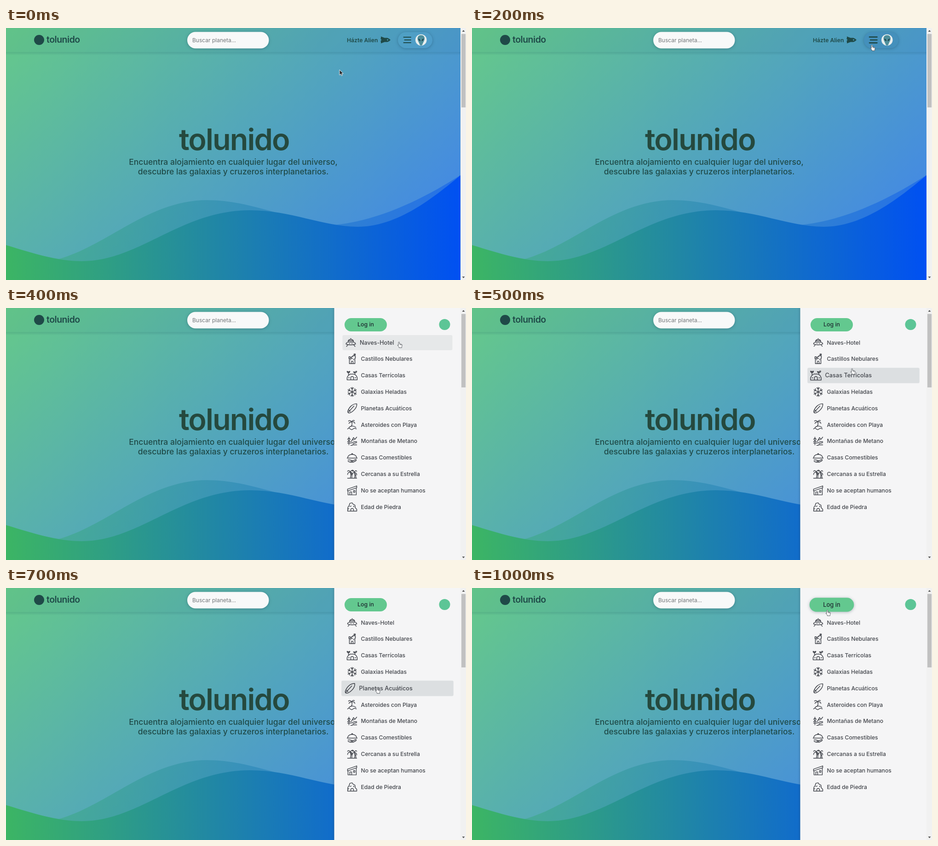
Recreate the animation shown at these times as an HTML page. Size 1000x549 px, loop 1.1 s.

```html
<!DOCTYPE html>
<html lang="es">
<head>
<meta charset="utf-8">
<title>tolunido</title>
<style>
  html, body { margin: 0; width: 100%; height: 100%; overflow: hidden; }
  svg { display: block; width: 1000px; height: 549px; font: 500 12.15px Inter, sans-serif; }
  .ink { fill: #1f4a48; }
  .line { fill: none; stroke: #40434a; stroke-width: 1.45; stroke-linecap: round; stroke-linejoin: round; }
  .soft { filter: drop-shadow(0 1px 3px rgba(10, 40, 60, .3)); }
  .row rect { fill: #dcdfe1; }
  .row text { fill: #42454b; }
</style>
</head>
<body>
<svg viewBox="0 0 1000 549">
  <defs>
    <linearGradient id="sky" gradientUnits="userSpaceOnUse" x1="110" y1="-110" x2="822" y2="602">
      <stop stop-color="#65c98a"/><stop offset="1" stop-color="#4286e8"/>
    </linearGradient>
    <linearGradient id="sea" gradientUnits="userSpaceOnUse" x1="0" y1="0" x2="989" y2="0">
      <stop stop-color="#3cb564"/><stop offset="1" stop-color="#0050f2"/>
    </linearGradient>
    <linearGradient id="shade" x2="0" y2="1">
      <stop stop-color="#0a3c50" stop-opacity=".14"/><stop offset="1" stop-color="#0a3c50" stop-opacity="0"/>
    </linearGradient>
  </defs>

  <rect width="989" height="549" fill="url(#sky)"/>
  <g fill="url(#sea)">
    <path fill-opacity=".45" d="M0 473C40 485 75 497 115 503C220 474 310 375 437 375C535 375 610 419 715 429C808 420 905 374 989 320V549H0Z"/>
    <path d="M0 473C60 491 110 508 165 508C290 508 380 397 530 397C620 397 690 433 765 433C850 433 928 371 989 320V549H0Z"/>
  </g>

  <g class="ink">
    <text x="376" y="266" font-size="65" font-weight="600" letter-spacing="-2" fill="#25493e">tolunido</text>
    <g font-size="17.5" text-anchor="middle">
      <text x="494" y="298">Encuentra alojamiento en cualquier lugar del universo,</text>
      <text x="494" y="318.5">descubre las galaxias y cruzeros interplanetarios.</text>
    </g>
  </g>

  <rect width="989" height="52.5" fill="#0a3c50" fill-opacity=".04"/>
  <rect y="52.5" width="989" height="7" fill="url(#shade)"/>
  <g class="ink">
    <circle cx="72" cy="26" r="11"/>
    <text x="88" y="32" font-size="19.5" font-weight="600" letter-spacing="-.5">tolunido</text>
    <text x="741" y="31" font-size="12.2" font-weight="600">Házte Alien</text>
    <path d="M815 18.5L823 21.5H829Q833 22.5 836 26Q833 29.5 829 30.5H823L815 33.5V29.5L814 28.5 816.5 26 814 23.5 815 22.5Z"/>
  </g>
  <circle cx="829.5" cy="26" r="1.4" fill="#4c9fb8"/>
  <rect class="soft" x="394" y="8.5" width="177.5" height="36" rx="18" fill="#f8f9f9"/>
  <text x="405" y="31" font-size="12" font-weight="400" fill="#73777a">Buscar planeta...</text>

  <rect id="pill" class="soft" x="852" y="9" width="75" height="35" rx="17.5"/>
  <path id="bars" class="line" style="stroke:#1f4a48" d="M864.5 20H880M866.5 26H880M864.5 32H880"/>
  <circle cx="902.3" cy="26" r="12.3" fill="#e8eeee"/>
  <path d="M902.3 15.5C907 15.5 910 18.5 910 23C910 28 906 32 905 37Q902.3 39 899.6 37C898.6 32 894.6 28 894.6 23C894.6 18.5 897.6 15.5 902.3 15.5Z" fill="#4e8f9b"/>
  <path d="M896.5 23Q900.5 24 901 28.5Q897 28 896.5 23ZM908 23Q904 24 903.5 28.5Q907.5 28 908 23Z" fill="#1d3b44"/>

  <g id="panel">
    <rect x="713.5" width="275.5" height="549" fill="#f5f5f6" style="filter:drop-shadow(-1px 0 2px rgba(20,40,60,.3))"/>
    <g id="login">
      <rect x="736" y="22" width="92" height="29" rx="14.5" fill="#63c88f"/>
      <text x="782" y="40.4" font-size="12.3" text-anchor="middle" fill="#1d2b30">Log in</text>
    </g>
    <circle cx="953.5" cy="36" r="12" fill="#5cc596"/>
    <g id="list"></g>
  </g>

  <rect x="988" width="12" height="549" fill="#f1f1f1"/>
  <rect x="990" y="13" width="9" height="160" fill="#c1c1c1"/>
  <path d="M991.5 8H997.5L994.5 4.5ZM991.5 541.5H997.5L994.5 545Z" fill="#505050"/>

  <path id="arrow" d="M0 0V11.5L2.7 9 4.5 13 6.4 12.2 4.7 8.3H8.2Z" fill="#24282c" stroke="#fff" stroke-width=".9"/>
  <path id="hand" d="M-2.8 1.5V-5.4Q-1.7 -7 -.6 -5.4V-1.8L3.6 -1Q5.3 -.6 5.2 1L4.4 4.6V6.6H-1.6V5L-4.9 1.2Q-4.8 -.6 -2.8 1.5ZM1 -1.4V1M3.1 -1V1.2" fill="#fff" stroke="#50545a" stroke-width=".9" stroke-linejoin="round"/>
</svg>
<script>
const $ = id => document.getElementById(id);
const STEP = 100;

// label and line icon, drawn around 0,0
const items = [
  ['Naves-Hotel', 'M-10 3Q-10 0 -6 -1H6Q10 0 10 3Q5 5 0 5T-10 3ZM-5.5 -1V-4Q-4 -7 0 -7T5.5 -4V-1M-5.5 -4H5.5M0 -7V-9M-6 4.5L-9 8M6 4.5L9 8M-3 2H-2M2 2H3'],
  ['Castillos Nebulares', 'M-6 10V-1H-7V-5H-4V-3H-1.5V-5H1V-7H7V-2H6V10ZM-2 10V6Q0 3 2 6V10M4 -7V-11H7V-9H4M-3.5 1V2M3.5 0V2M-6 -1H1'],
  ['Casas Terrícolas', 'M-11 9.5H11V5Q9 -2 3 -3H-4Q-9 -1 -11 5ZM-3 9.5V4Q0 0 3 4V9.5M-8 -2V-6Q-11 -6 -11 -9Q-8 -9 -8 -6Q-8 -9 -5 -9Q-5 -6 -8 -6M6 -2V-6Q3 -6 3 -8Q6 -8 6 -6Q7 -10 10 -9Q10 -6 6 -6M-8 5H-6M6 5H8'],
  ['Galaxias Heladas', 'M0 -10V10M-9 -5L9 5M-9 5L9 -5M-3 -9L0 -6 3 -9M-3 9L0 6 3 9M-9 -1.5L-5.5 -3 -6 -7M9 1.5L5.5 3 6 7M-9 1.5L-5.5 3 -6 7M9 -1.5L5.5 -3 6 -7'],
  ['Planetas Acuáticos', 'M10 -10Q11 -3 4 4T-8 10Q-10 9 -9.5 6Q-7 -1 -2 -5.5T10 -10ZM-8.5 8.5L4 -5M-4 7L-7 4'],
  ['Asteroides con Playa', 'M-10 9Q-7 6 -4 9T2 9T9 9M-7 6Q-3 2 2 3T8 6M-2 3Q1 -1 -1 -6M-1 -6Q-5 -7 -7 -3M-1 -6Q-4 -11 -8 -8M-1 -6Q1 -11 5 -9M-1 -6Q4 -8 6 -3'],
  ['Montañas de Metano', 'M-7 8V-9M-10 -4L-7 -7 -4 -4M-10 1L-7 -2 -4 1M-2 1L3 -8 6 -4 10 -9M0 -3H4M-10 4H-2L5 1H10M10 3L3 5Q0 7 3 8H10M-3 9H1'],
  ['Casas Comestibles', 'M-10 1Q-9 -7 0 -7T10 1ZM-1.5 -7Q0 -11 1.5 -7M-11 1H11M-9 5H-5L-1 6Q2 7 1 8H-3M1 7L8 4Q10 5 8 7L2 10H-4L-9 8'],
  ['Cercanas a su Estrella', 'M-4 9Q-2 2 -4 -4M-1 9Q1 2 -4 -4M-4 -4Q-9 -5 -10 1M-4 -4Q-7 -10 -10 -6M-4 -4Q-2 -10 2 -6M-4 -4Q0 -4 0 0M5 9Q7 3 5 -3M8 9Q9 3 5 -3M5 -3Q1 -4 0 2M5 -3Q3 -10 -1 -8M5 -3Q7 -10 10 -6M5 -3Q10 -3 10 2M-10 9H10'],
  ['No se aceptan humanos', 'M-10 -3L10 -10V-6L-10 1ZM-9 1V9.5H9V-5M-5 9.5V3H-1V9.5M3 0H6V4H3Z'],
  ['Edad de Piedra', 'M-10 9H10V5L7 2 6 -4 2 -6 0 -9 -5 -8 -7 -2 -9 0ZM-3 9V5Q0 1 3 5V9M-5 -1L-2 -2M3 -2L4 0M-10 4H-7']
];

// one pose per step: pointer x, y, then hovered row and its strength in pairs
const poses = [
  [725, 91], [800, 63], [871, 43], [871, 43],
  [856, 80, 0, .6], [828, 138, 2, 1], [816, 239, 3, .25, 4, .6],
  [808, 223, 4, 1], [800, 199, 3, 1], [787, 125, 1, 1], [774, 54]
];

const rowY = i => 75.4 + 35.8 * i;
const scaleAt = (x, y, s) => `translate(${x} ${y}) scale(${s}) translate(${-x} ${-y})`;

$('list').innerHTML = items.map(([label, icon], i) => {
  const y = rowY(i);
  return `<g class="row"><rect x="735" y="${y - 16}" width="232" height="32" rx="3"/>
    <path class="line" transform="translate(752.5 ${y})" d="${icon}"/>
    <text x="771.5" y="${y + 4.2}">${label}</text></g>`;
}).join('');
const rows = [...$('list').children];

function show(el, on) {
  el.style.display = on ? '' : 'none';
}

function draw(n) {
  const [x, y, ...hover] = poses[n];
  const onMenu = n === 2, onLogin = n === 10;
  show($('panel'), n > 2);
  show($('arrow'), n < 2);
  show($('hand'), n > 1);
  for (const id of ['arrow', 'hand']) $(id).setAttribute('transform', `translate(${x} ${y})`);

  $('pill').setAttribute('fill', onMenu ? '#4490bc' : 'url(#sky)');
  $('bars').style.strokeWidth = onMenu ? 2.5 : 2;
  $('bars').setAttribute('transform', scaleAt(872, 26, onMenu ? 1.06 : 1));
  $('login').setAttribute('transform', scaleAt(782, 36.5, onLogin ? 1.05 : 1));
  $('login').firstElementChild.setAttribute('class', onLogin || n === 3 ? 'soft' : '');

  rows.forEach((row, i) => {
    const at = hover.findIndex((v, k) => k % 2 === 0 && v === i);
    const k = at < 0 ? 0 : hover[at + 1];
    row.setAttribute('transform', scaleAt(851, rowY(i), 1 + .05 * k));
    row.firstElementChild.style.opacity = k;
  });
}

let last = -1;
function tick() {
  const n = Math.floor(performance.now() / STEP) % poses.length;
  if (n !== last) draw(last = n);
  requestAnimationFrame(tick);
}
tick();
</script>
</body>
</html>
```
